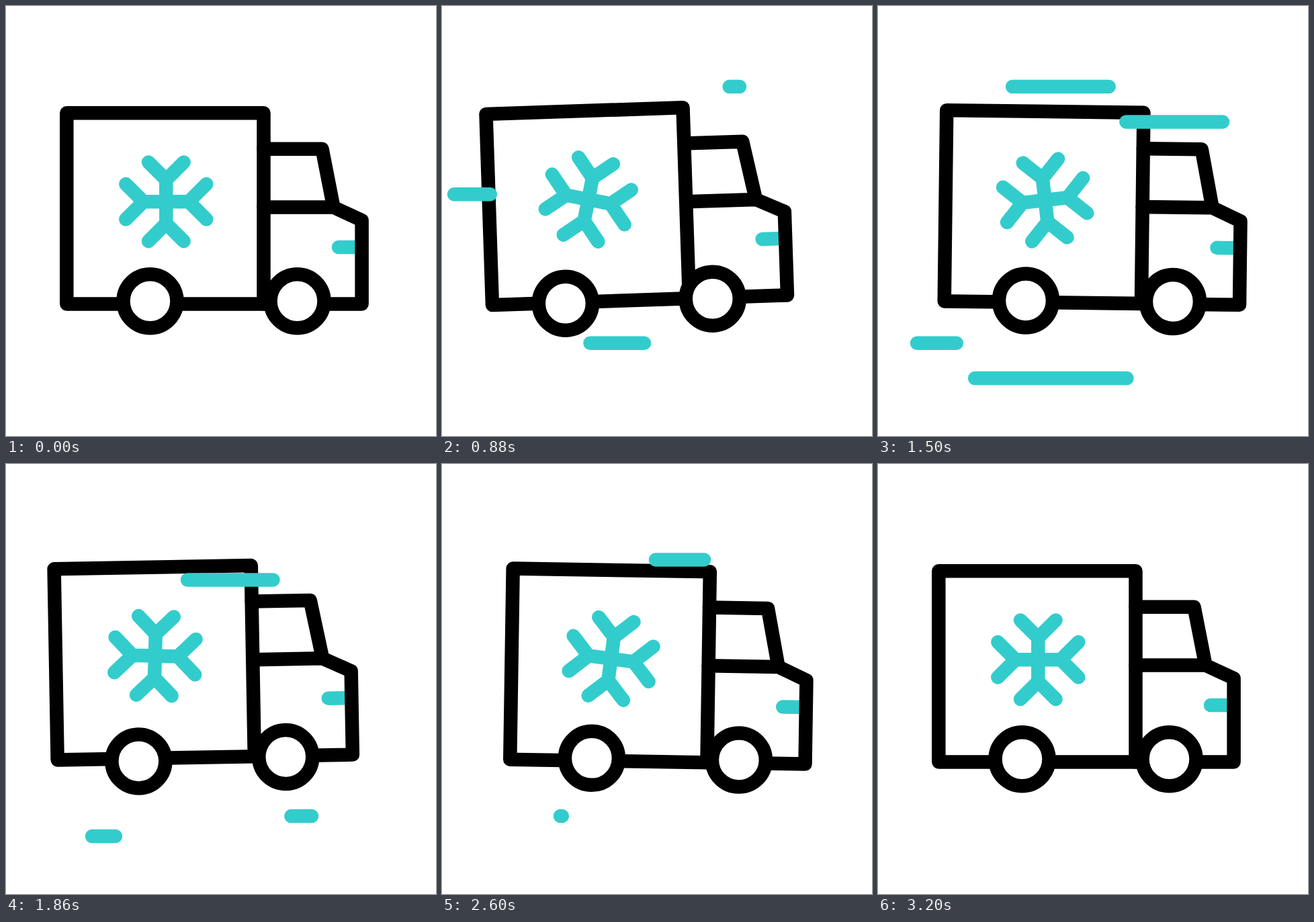
These frames come from a looping animation (640x640 px, 3300 ms). An HTML page:

```html
<!DOCTYPE html>
<html lang="en">
<head>
<meta charset="utf-8">
<title>Refrigerated truck</title>
<style>
  html, body { margin: 0; width: 100%; height: 100%; overflow: hidden; background: #fff; }
  svg { display: block; width: 100vw; height: 100vh; }
  path, line, circle { fill: none; stroke: #000; stroke-width: 20.5; stroke-linecap: round; stroke-linejoin: round; }
  .ice { stroke: #33cccc; }
  circle { fill: #fff; }
</style>
</head>
<body>
<svg viewBox="0 0 640 640">
  <defs>
    <path id="arm" class="ice" d="M0 0V-32.5M-26.3 -58.8L0 -32.5L26.3 -58.8"/>
  </defs>
  <g id="body">
    <path class="ice" d="M495 359H526"/>
    <g id="flake">
      <use href="#arm"/>
      <use href="#arm" transform="rotate(180)"/>
      <use href="#arm" transform="translate(1.2) rotate(90)"/>
      <use href="#arm" transform="translate(-1.2) rotate(-90)"/>
    </g>
    <path d="M90.3 159.3H383.5V443.5H90.3Z"/>
    <path d="M383.5 212.7H470.5L487.5 299.5L529.6 319V443.5H383.5M383.5 299.5H487.5"/>
  </g>
  <g id="wheels">
    <circle cx="214.5" cy="439.2" r="40"/>
    <circle cx="433.5" cy="439.2" r="40"/>
  </g>
  <g id="streaks"></g>
</svg>
<script>
const LOOP = 3300, START = 300, END = 3200;
const $ = id => document.getElementById(id);

const clamp = p => Math.min(1, Math.max(0, p));
const ease = p => p * p * (3 - 2 * p);
const mix = (a, b, p) => a + (b - a) * p;

// Eased value between { at, v } steps
function tween(steps, t) {
  const i = Math.max(1, steps.findIndex(s => s.at >= t));
  const a = steps[i - 1], b = steps[i];
  const p = ease(clamp((t - a.at) / (b.at - a.at)));
  return a.v.map((n, k) => mix(n, b.v[k], p));
}

// Pose: body x, y, angle, then wheels x, angle
const rest = [0, 0, 0, 0, 0];
const launch = [-16, -5.9, -1.95, -31.4, -1.88];
const ahead = [12.5, -0.4, 1.02, 9.6, 0.8];
const back = [-14.1, -7.1, -1.05, -17.6, -1.73];

const BEAT = 530;
const ride = [
  { at: START, v: rest },
  ...[launch, ahead, back, ahead].map((v, i) => ({ at: 840 + i * BEAT, v })),
  { at: END, v: rest },
  { at: LOOP, v: rest }
];

const swing = [[START, 0], [860, 13], [1540, -7.5], [2270, 17], [2850, 0], [LOOP, 0]]
  .map(([at, angle]) => ({ at, v: [angle] }));

// Each streak grows leftwards, its tail following after `lag`
const TRAVEL = 490;
const streak = (y, from, length, start, lag) => {
  const el = document.createElementNS('http://www.w3.org/2000/svg', 'line');
  el.setAttribute('class', 'ice');
  el.setAttribute('y1', y);
  el.setAttribute('y2', y);
  $('streaks').append(el);
  return t => {
    const x = delay => from - length * ease(clamp((t - start - delay) / TRAVEL));
    el.setAttribute('x1', x(0));
    el.setAttribute('x2', x(lag));
    el.setAttribute('visibility', t > start && t < start + lag + TRAVEL ? 'visible' : 'hidden');
  };
};
const streaks = [
  streak(280.2, 256, 238, 305, 237),
  streak(501.8, 301, 243, 692, 476),
  streak(120, 443, 243, 806, 480),
  streak(554, 371, 243, 1088, 400),
  streak(172.5, 513, 243, 1226, 398),
  streak(524, 455, 279, 1760, 380),
  streak(142.5, 597, 279, 1891, 383)
];

function place(id, x, y, angle, px = 0, py = 0) {
  $(id).setAttribute('transform', `translate(${x} ${y}) rotate(${angle} ${px} ${py})`);
}

function draw(t) {
  const [x, y, tilt, wheelX, wheelTilt] = tween(ride, t);
  place('body', x, y, tilt, 309.75, 443.5);
  place('wheels', wheelX, 0, wheelTilt, 324, 439.2);
  place('flake', 238.3, 291.3, tween(swing, t)[0]);
  streaks.forEach(update => update(t));
}

const begin = performance.now();
function tick() {
  draw((performance.now() - begin) % LOOP);
  requestAnimationFrame(tick);
}
tick();
</script>
</body>
</html>
```
